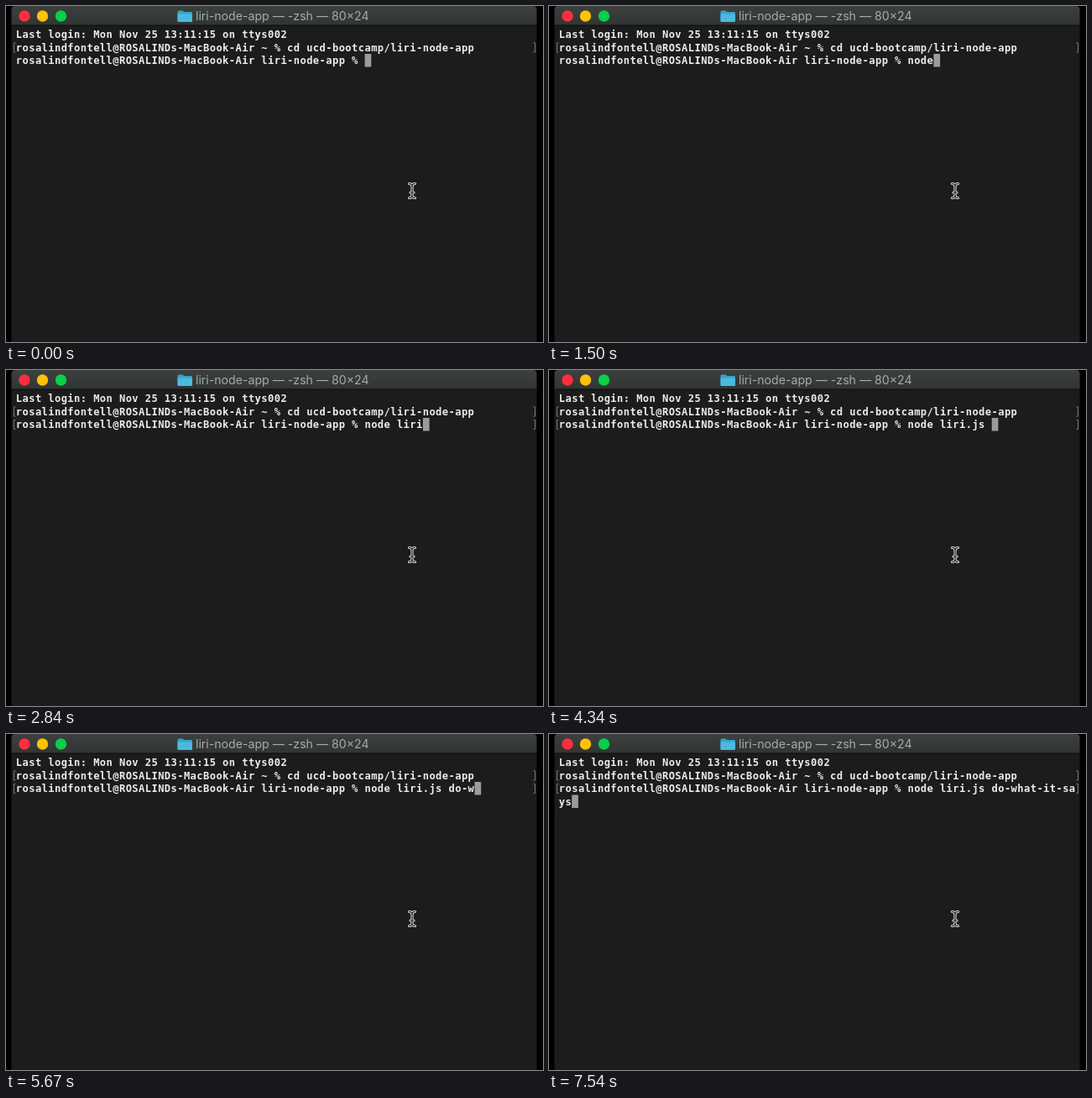
An HTML page for the animation above (8 s loop, 640x400 px).

```html
<!DOCTYPE html>
<html lang="en">
<head>
<meta charset="utf-8">
<title>Terminal typing</title>
<style>
  html, body { margin: 0; width: 100%; height: 100%; overflow: hidden; background: #000; }
  svg { display: block; width: 640px; height: 400px; }
  .term { font: bold 12.1px "DejaVu Sans Mono", monospace; letter-spacing: .416px; fill: #ececec; white-space: pre; }
  .title { font: 14.15px Inter, sans-serif; fill: #a7aaaa; }
  .marks { fill: none; stroke: #777; }
</style>
</head>
<body>
<svg viewBox="0 0 640 400">
  <defs>
    <linearGradient id="bar" x2="0" y2="1">
      <stop stop-color="#3c4140"/><stop offset="1" stop-color="#303534"/>
    </linearGradient>
    <path id="brackets" d="M11.5 .5H9.5V11.5H11.5M628.5 .5H630.5V11.5H628.5"/>
    <path id="beam" d="M480.5 211.5Q484 211.5 484 215V225Q484 228.5 480.5 228.5M487.5 211.5Q484 211.5 484 215M484 225Q484 228.5 487.5 228.5M482 222H486"/>
  </defs>

  <rect x="6.5" y="20" width="626" height="380" fill="#1c1c1c"/>
  <path d="M6.5 23V4.5Q6.5 0 11 0H628Q632.5 0 632.5 4.5V23Z" fill="url(#bar)"/>
  <rect x="6.5" y="22.5" width="626" height="1" fill="#0c0d0d"/>
  <circle cx="22" cy="12" r="6.7" fill="#ff2d3f"/>
  <circle cx="43.5" cy="12" r="6.7" fill="#ffc107"/>
  <circle cx="65.5" cy="12" r="6.7" fill="#08d048"/>

  <path d="M204.5 7Q204.5 5.5 206 5.5H210.5L212 7H220.5Q222 7 222 8.5V17.5Q222 19 220.5 19H206Q204.5 19 204.5 17.5Z" fill="#38a2c8"/>
  <path d="M204.5 9.5H222V17.5Q222 19 220.5 19H206Q204.5 19 204.5 17.5Z" fill="#4bb9de"/>
  <text class="title" x="226" y="17">liri-node-app — -zsh — 80×24</text>

  <g class="marks">
    <use href="#brackets" y="43.5"/>
    <use id="promptMarks" href="#brackets" y="59"/>
  </g>
  <rect id="cursor" width="7.7" height="15.5" fill="#9b9b9b"/>
  <g id="lines" class="term"></g>

  <g fill="none" stroke-linecap="round">
    <use href="#beam" stroke="#d6d6d6" stroke-width="3.2"/>
    <use href="#beam" stroke="#1a1a1a" stroke-width="1.1"/>
  </g>
</svg>
<script>
const LOOP = 8000, COLUMNS = 80, CELL = 7.7, ROW = 15.5, LEFT = 11.8, TOP = 26;
const BASELINE = 12;
const MARKS_AT = 2430;
const host = "rosalindfontell@ROSALINDs-MacBook-Air";
const history = [
  "Last login: Mon Nov 25 13:11:15 on ttys002",
  host + " ~ % cd ucd-bootcamp/liri-node-app"
];
const prompt = host + " liri-node-app % ";

// Time of each keystroke; "\b" is a backspace.
const keys = [
  [1100, "n"], [1240, "o"], [1370, "d"], [1500, "e"], [1630, " l"],
  [1770, "i"], [1900, "r"], [2030, "i"], [2160, "."], [2840, "\b"],
  [3380, ".js "], [5130, "d"], [5260, "o"], [5400, "-"], [5670, "w"],
  [5800, "h"], [5940, "a"], [6070, "t"], [6200, "-"], [6590, "i"],
  [6730, "t"], [6870, "-"], [7140, "s"], [7270, "a"], [7410, "y"], [7540, "s"]
];

const byId = id => document.getElementById(id);
const cursor = byId("cursor"), promptMarks = byId("promptMarks");

function addLine(row, content = "") {
  const line = document.createElementNS("http://www.w3.org/2000/svg", "text");
  line.setAttribute("x", LEFT);
  line.setAttribute("y", TOP + row * ROW + BASELINE);
  line.textContent = content;
  byId("lines").append(line);
  return line;
}

history.forEach((content, row) => addLine(row, content));
const inputLines = [addLine(2), addLine(3)];

function typedAt(time) {
  return keys.filter(([at]) => at <= time)
    .reduce((text, [, key]) => key === "\b" ? text.slice(0, -1) : text + key, "");
}

function draw(time) {
  const input = prompt + typedAt(time);
  inputLines.forEach((line, i) => {
    line.textContent = input.slice(i * COLUMNS, (i + 1) * COLUMNS);
  });
  cursor.setAttribute("x", LEFT + input.length % COLUMNS * CELL);
  cursor.setAttribute("y", TOP + (2 + Math.floor(input.length / COLUMNS)) * ROW);
  promptMarks.setAttribute("visibility", time >= MARKS_AT ? "visible" : "hidden");
}

const start = performance.now();
function frame() {
  draw((performance.now() - start) % LOOP);
  requestAnimationFrame(frame);
}
frame();
</script>
</body>
</html>
```
